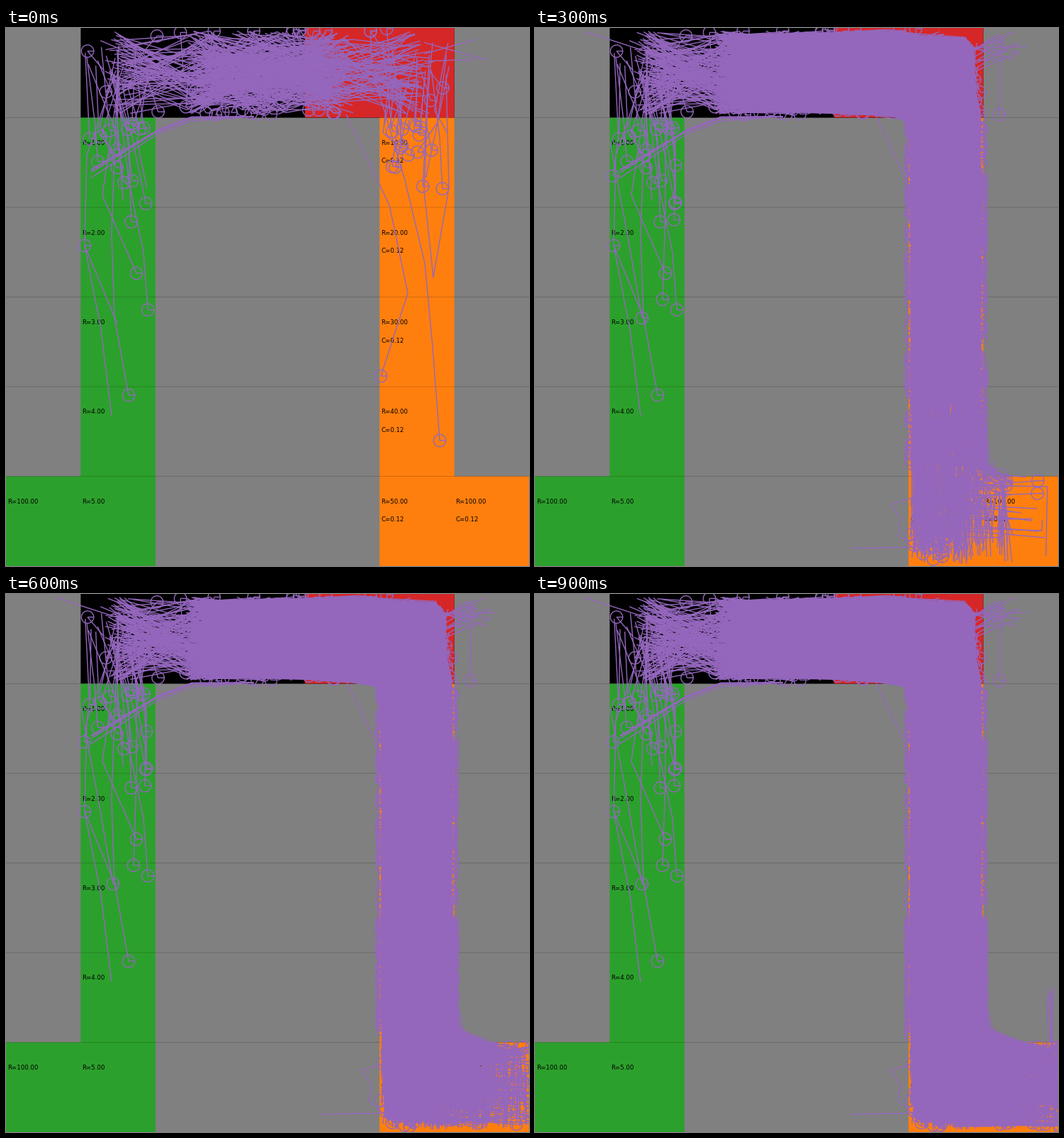
Animation, 738 px wide and 759 px high, one loop 1000 ms. Source, as a matplotlib script:

```python
import numpy as np
import matplotlib.pyplot as plt
from matplotlib.animation import FuncAnimation
from matplotlib.collections import LineCollection
from matplotlib.patches import Rectangle

W, H, DPI = 738, 759, 100
CW, CH = W / 7, H / 6
FRAMES = 10
PURPLE, GREEN, ORANGE, RED = "#9467bd", "#2ca02c", "#ff7f0e", "#d62728"
rng = np.random.default_rng(12)
uniform, normal = rng.uniform, rng.normal

fig = plt.figure(figsize=(W / DPI, H / DPI), dpi=DPI, facecolor="#808080")
ax = fig.add_axes([0, 0, 1, 1])
ax.set_xlim(0, W)
ax.set_ylim(H, 0)
ax.axis("off")


# ---- maze ----
def block(col, row, cols, rows, color):
    ax.add_patch(Rectangle((col * CW, row * CH), cols * CW, rows * CH,
                           facecolor=color, linewidth=0, zorder=1, snap=False))


def label(col, row, reward, cost=None):
    style = dict(fontsize=6.25, family="DejaVu Sans", color="black", zorder=3)
    x, y = col * CW + 2, row * CH
    ax.text(x, y + 38.5, f"R={reward:.2f}", **style)
    if cost:
        ax.text(x, y + 64, f"C={cost:.2f}", **style)


block(1, 0, 5, 1, "black")
block(4, 0, 2, 1, RED)
block(1, 1, 1, 5, GREEN)
block(0, 5, 2, 1, GREEN)
block(5, 1, 1, 5, ORANGE)
block(5, 5, 2, 1, ORANGE)
for row in range(1, 6):
    ax.axhline(row * CH, color="black", alpha=0.2, linewidth=0.6, zorder=2, snap=False)
    label(1, row, row)
    label(5, row, 10 * row, 0.12)
label(0, 5, 100)
label(6, 5, 100, 0.12)

# ---- strokes, grouped by the step in which they appear ----
layers = [[] for _ in range(FRAMES)]
TURN = np.linspace(0, 2 * np.pi, 28)
RING = np.vstack([[0, 0], 8.7 * np.column_stack([np.cos(TURN), np.sin(TURN)])])


def stroke(step, pts, ring=False):
    layers[step].append(np.array(pts, float))
    if ring:
        layers[step].append(RING + np.array(pts[-1], float))


def fold(a, lo, hi):
    """Reflect values at both limits, like a ball between two walls."""
    a = np.mod(a - lo, 2 * (hi - lo))
    return lo + np.minimum(a, 2 * (hi - lo) - a)


def bend(corner, before, after, r):
    """Quadratic bend around a corner between two unit directions."""
    t = np.linspace(0, 1, 9)[:, None]
    c = np.array(corner)
    a, b = c - r * np.array(before), c + r * np.array(after)
    return (1 - t) ** 2 * a + 2 * t * (1 - t) * c + t ** 2 * b


def lane(v):
    """Route right, down, right; v runs from the outer to the inner first bend."""
    x, top, low = 628 - 98 * v, 4 + 118 * v, 637 + 116 * v
    pts = np.vstack([[365, top], bend((x, top), (1, 0), (0, 1), 60 - 32 * v),
                     [x, 200], [x, 540],
                     bend((x, low), (0, 1), (1, 0), 65 - 25 * v), [742, low]])
    s = np.r_[0, np.linspace(150, 250, 9), 340, 680, np.linspace(750, 870, 9), 1000]
    at = np.arange(1000)
    return np.column_stack([np.interp(at, s, pts[:, 0]), np.interp(at, s, pts[:, 1])])


LANES = np.array([lane(v) for v in np.linspace(0, 1, 101)])


def right_run(step, reach, begin=0, spread=0.5):
    """A wandering run along the lanes; some end with a ring at a wall."""
    s = np.append(np.arange(begin, reach - 30, 100) + uniform(-14, 14), reach)
    v = fold(normal(0.5, spread) + np.cumsum(normal(0, 0.14, len(s))), 0, 1)
    pts = LANES[(v * 100).astype(int), np.clip(s, 0, 999).astype(int)]
    pts = pts + normal(0, 1.2, pts.shape)
    if begin == 0:
        pts[0] = uniform(256, 390), fold(pts[0, 1], 9, 119)
    ring = rng.random() < 0.25
    x, y = pts[-1]
    if ring and 140 < y < 625:
        inset = abs(normal(0, 4))
        pts[-1, 0] = 529.5 + inset if x < 572 else 630.5 - inset
    stroke(step, pts, ring)


def band_run(step, xs, spread):
    """A run through the top band with one random height per stop."""
    stroke(step, list(zip(xs, fold(normal(63, spread, len(xs)), 4, 122))))


def descent(step, left, depth):
    """A run from the top band down one arm, ending in a ring."""
    y = np.append(np.arange(uniform(20, 80), depth - 30, 95), depth)
    x = fold(left + uniform(25, 85) + np.cumsum(normal(0, 20, len(y))), left + 3, left + 99)
    stroke(step, list(zip(x, y)), rng.random() < 0.8)


# Loose bundle around the start, then more of the same to the left.
for _ in range(75):
    band_run(0, [uniform(350, 400), uniform(254, 292), normal(160, 9)], 40)
    band_run(0, [uniform(310, 400), uniform(442, 490), normal(575, 16)], 38)
for _ in range(170):
    band_run(0, [uniform(254, 292), uniform(330, 400), uniform(442, 490)], 32)
for _ in range(75):
    band_run(1, [uniform(350, 400), uniform(254, 292), normal(160, 9)], 44)
for _ in range(250):
    band_run(1, [uniform(350, 420), uniform(254, 292)], 44)
for x in uniform(110, 620, 32):
    y = rng.choice([5, 119]) if 165 < x < 555 else uniform(5, 120)
    stroke(0, [(x + normal(0, 30), 60), (x, y + normal(0, 3))], True)

# Early descents, mostly short, with a few long ones.
for _ in range(20):
    descent(0, CW, 135 + rng.exponential(50))
    descent(0, 5 * CW, 135 + rng.exponential(42))
for _ in range(5):
    descent(1, CW, uniform(150, 280))
    shift = normal(0, 4)
    stroke(0, [(350, 125), (262, 128 + shift), (213, 147 + shift), (120, 205 + 2 * shift)])
stroke(0, [(155, 60), (114, 180), (111, 307), (134, 425), (149, 547)])
stroke(0, [(157, 417), (111, 307)], True)
stroke(0, [(158, 40), (149, 290), (153, 407), (173, 518)], True)
stroke(0, [(160, 70), (136, 236), (184, 346)], True)
stroke(0, [(480, 122), (541, 250), (567, 374), (529, 491)], True)
stroke(0, [(520, 70), (563, 215), (591, 332), (602, 450), (612, 582)], True)
stroke(0, [(621, 66), (625, 225), (603, 352), (590, 230), (595, 100)])
stroke(1, [(184, 130), (184, 260), (180, 383)], True)
stroke(1, [(106, 161), (132, 300), (151, 409)], True)
stroke(1, [(70, 5), (160, 34), (250, 60)])

# Runs down the right arm that go further with every step.
for _ in range(640):
    right_run(1, 250 + 150 * abs(normal()), spread=0.26)
for _ in range(50):
    right_run(1, uniform(480, 850), spread=0.2)
for _ in range(560):
    right_run(2, min(350 + 235 * abs(normal()), 870), spread=0.3)
for step in range(3, FRAMES):
    for _ in range(int(1000 * 0.83 ** step)):
        right_run(step, uniform(600, min(1100, 680 + 60 * step)), begin=100)

# Overshoots: down at the bottom, and past the outer walls.
for step in range(1, FRAMES):
    for _ in range(int(130 * np.exp(-((step - 4) / 2) ** 2))):
        x = uniform(532 + 4 * step, min(737, 560 + 35 * step))
        stroke(step, [(x, uniform(630, 685)), (x + normal(0, 9), uniform(705, 756))])
for step in range(5):
    for _ in range(3):
        stroke(step, [(590, uniform(20, 80)), (uniform(650, 705), uniform(5, 50))])
for step in (2, 3):
    for _ in range(6):
        y = uniform(645, 715)
        stroke(step, [(605, y), (uniform(655, 726), y + normal(0, 10))], rng.random() < 0.5)
for _ in range(5):
    x = uniform(708, 736)
    stroke(7, [(x, uniform(545, 570)), (x + normal(0, 5), 650)])
stroke(1, [(600, 40), (658, 10), (655, 122)], True)
stroke(1, [(608, 590), (612, 706), (715, 709), (716, 694)])
stroke(1, [(553, 600), (549, 717), (655, 719)])
stroke(3, [(610, 645), (723, 647), (721, 745)])
stroke(3, [(445, 734), (550, 732)])
stroke(3, [(535, 662), (502, 672), (516, 692), (512, 715), (535, 735)])

drawn = []
for strokes in layers:
    group = LineCollection(strokes, colors=PURPLE, linewidths=1.0, zorder=4)
    drawn.append(ax.add_collection(group, autolim=False))


def update(frame):
    for step, group in enumerate(drawn):
        group.set_visible(step <= frame)
    return drawn


anim = FuncAnimation(fig, update, frames=FRAMES, interval=100, repeat=True,
                     repeat_delay=0, init_func=lambda: update(0), blit=False)
plt.show()
```
